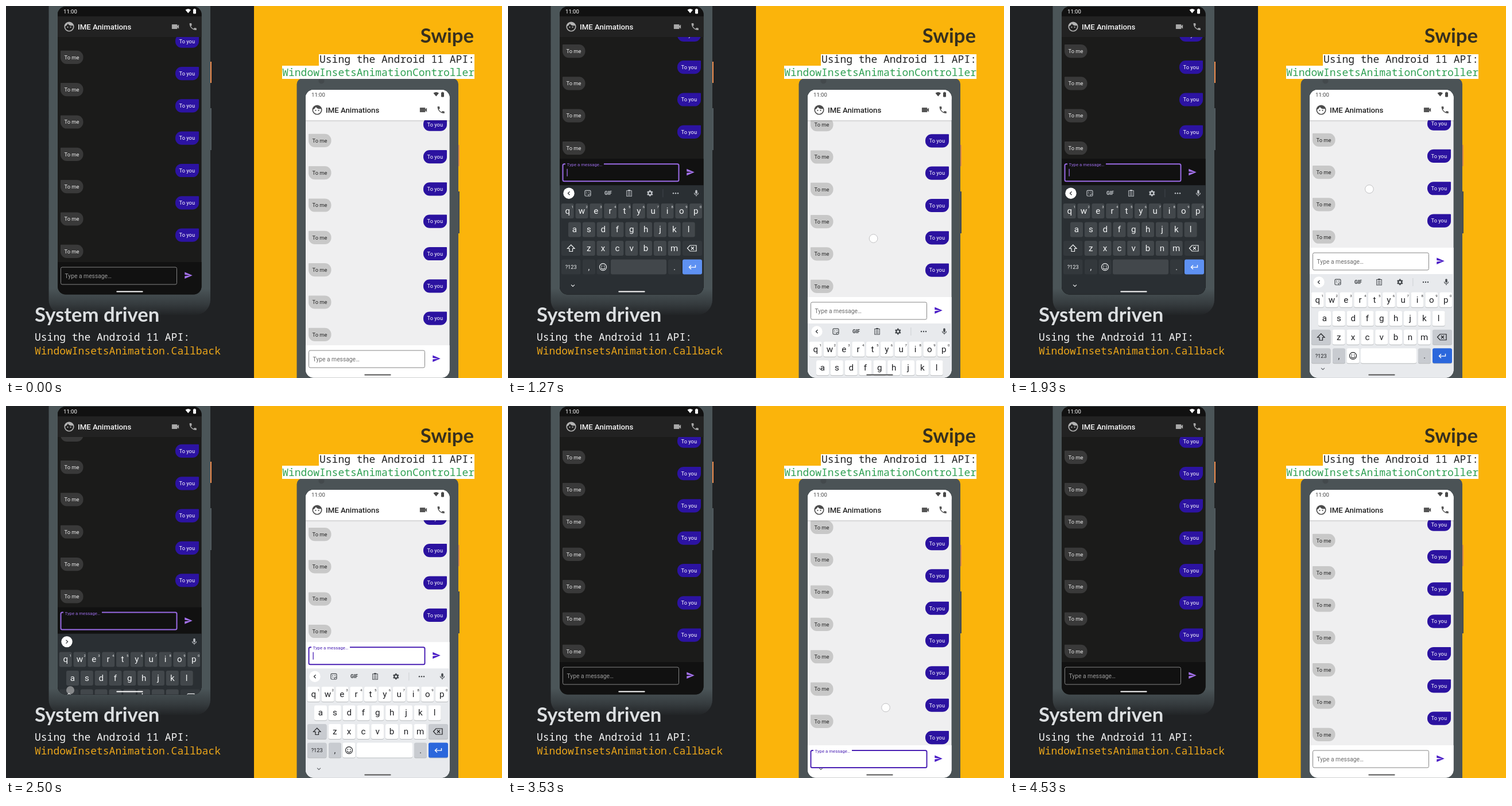
Animation of 864x648 px, one loop 4.7 s. Source, as an HTML page with a canvas:

```html
<!DOCTYPE html>
<html lang="en">
<head>
<meta charset="utf-8">
<title>Keyboard animations</title>
<style>
html, body { margin: 0; width: 100%; height: 100%; overflow: hidden; background: #202224; }
canvas { display: block; width: 864px; height: 648px; }
</style>
</head>
<body>
<canvas id="stage" width="864" height="648"></canvas>
<script>
const ctx = document.getElementById('stage').getContext('2d');
const LOOP = 4700, OPEN = 179.8;
const SANS = 'Roboto, sans-serif', MONO = '"Noto Sans Mono", monospace', TITLE = 'Lato, sans-serif';

const DARK = {
  body: '#4b5558', status: '#111111', header: '#222222', chat: '#1b1b1a', panel: '#111111',
  icon: '#a8a8a8', face: '#b4b4b4', title: '#f4f4f4', statusInk: '#ffffff',
  me: '#393939', meInk: '#eeeeee', you: '#2c13a2', line: '#848484', hint: '#9b9b9b',
  accent: '#9a6be6', send: '#a572ee', board: '#2a2f33', key: '#42474b', fn: '#33383c',
  keyInk: '#f1f3f4', tool: '#bdc1c6', round: '#ffffff', enter: '#5e91f2', enterInk: '#ffffff',
  pill: '#ffffff', orange: '#ee8b4c', side: '#50595d'
};
const LIGHT = {
  body: '#4b5356', status: '#ffffff', header: '#ffffff', chat: '#efeff0', panel: '#ffffff',
  icon: '#555555', face: '#4c4c4c', title: '#222222', statusInk: '#474747',
  me: '#c8c8c8', meInk: '#222222', you: '#2b12a0', line: '#858585', hint: '#6c6c6c',
  accent: '#4a20b4', send: '#4a1cc6', board: '#e8eaed', key: '#ffffff', fn: '#c8cbd0',
  keyInk: '#202124', tool: '#44484c', round: '#ffffff', enter: '#2b67dc', enterInk: '#ffffff',
  pill: '#555555', orange: '#dd8b43', side: '#454c50', shadow: true
};

// 24-unit icons
const ICONS = {
  video: 'M17 10.5V7c0-.55-.45-1-1-1H4c-.55 0-1 .45-1 1v10c0 .55.45 1 1 1h12c.55 0 1-.45 1-1v-3.5l4 4v-11l-4 4z',
  call: 'M6.6 10.8c1.4 2.8 3.8 5.1 6.6 6.6l2.2-2.2c.3-.3.7-.4 1-.2 1.1.4 2.3.5 3.6.5.5 0 1 .5 1 1V20c0 .5-.5 1-1 1C10.600 21 3 13.400 3 4c0-.5.5-1 1-1h3.500c.5 0 1 .5 1 1 0 1.250.2 2.450.6 3.600.1.3 0 .7-.3 1z',
  face: 'M7.7 13a1.300 1.300 0 1 0 2.600 0a1.300 1.300 0 1 0-2.600 0zM13.700 13a1.300 1.300 0 1 0 2.600 0a1.300 1.300 0 1 0-2.600 0zM12 2a10 10 0 1 0 0 20a10 10 0 1 0 0-20zm0 18c-4.400 0-8-3.600-8-8l.05-.86c2.360-1.050 4.230-2.980 5.200-5.370C11.070 8.330 14.050 10 17.420 10l2.250-.26c.2.7.33 1.470.33 2.260 0 4.400-3.600 8-8 8z',
  send: 'M2 21L23 12L2 3V10L17 12L2 14z',
  mic: 'M12 14a3 3 0 0 0 3-3V5a3 3 0 0 0-6 0v6a3 3 0 0 0 3 3zM5 11h2a5 5 0 0 0 10 0h2a7 7 0 0 1-6 6.900V21h-2v-3.100A7 7 0 0 1 5 11z',
  wifi: 'M12 21L0 6.500Q12-2 24 6.500z'
};
for (const k in ICONS) ICONS[k] = new Path2D(ICONS[k]);

const clamp = (v, a = 0, b = 1) => Math.min(b, Math.max(a, v));
const lerp = (a, b, p) => a + (b - a) * p;
const ramp = (t, a, b) => clamp((t - a) / (b - a));
const smooth = p => p * p * (3 - 2 * p);

function track(t, pts) {
  if (t <= pts[0][0]) return pts[0][1];
  for (let i = 1; i < pts.length; i++) {
    const [a, va] = pts[i - 1], [b, vb] = pts[i];
    if (t <= b) return lerp(va, vb, (t - a) / (b - a));
  }
  return pts[pts.length - 1][1];
}

// cubic-bezier(.2, 0, 0, 1)
function glide(x) {
  let lo = 0, hi = 1;
  for (let i = 0; i < 24; i++) {
    const m = (lo + hi) / 2;
    if (0.6 * m * (1 - m) * (1 - m) + m * m * m < x) lo = m; else hi = m;
  }
  return lo * lo * (3 - 2 * lo);
}

function text(s, x, y, size, color, { weight = 400, align = 'left', family = SANS } = {}) {
  ctx.font = `${weight} ${size}px ${family}`;
  ctx.textAlign = align;
  ctx.fillStyle = color;
  ctx.fillText(s, x, y);
}
const label = (s, x, y, size, color, opt) => text(s, x, y + size * 0.355, size, color, opt);

function rect(x, y, w, h, color) {
  ctx.fillStyle = color;
  ctx.fillRect(x, y, w, h);
}
function round(x, y, w, h, r, color) {
  ctx.fillStyle = color;
  ctx.beginPath();
  ctx.roundRect(x, y, w, h, r);
  ctx.fill();
}
function disc(x, y, r, color) {
  ctx.fillStyle = color;
  ctx.beginPath();
  ctx.arc(x, y, r, 0, Math.PI * 2);
  ctx.fill();
}
function ring(x, y, r, color, width = 1.2) {
  ctx.strokeStyle = color;
  ctx.lineWidth = width;
  ctx.beginPath();
  ctx.arc(x, y, r, 0, Math.PI * 2);
  ctx.stroke();
}
function line(pts, color, width = 1.3, close) {
  ctx.strokeStyle = color;
  ctx.lineWidth = width;
  ctx.beginPath();
  for (const [x, y] of pts) ctx.lineTo(x, y);
  if (close) ctx.closePath();
  ctx.stroke();
}
function icon(name, x, y, scale, color) {
  ctx.save();
  ctx.translate(x - 12 * scale, y - 12 * scale);
  ctx.scale(scale, scale);
  ctx.fillStyle = color;
  ctx.fill(ICONS[name], 'evenodd');
  ctx.restore();
}

function smiley(x, y, r, color) {
  ring(x, y, r, color);
  disc(x - r * 0.37, y - r * 0.25, 0.9, color);
  disc(x + r * 0.37, y - r * 0.25, 0.9, color);
  ctx.beginPath();
  ctx.arc(x, y + 0.4, r * 0.55, 0.2, Math.PI - 0.2);
  ctx.stroke();
}

function toolbar(c, y, collapsed) {
  const ink = c.tool;
  disc(106, y, 9.7, c.round);
  const d = collapsed ? 1 : -1;
  line([[106 - d * 1.5, y - 3], [106 + d * 1.5, y], [106 - d * 1.5, y + 3]], '#303438');
  icon('mic', 328, y, 0.58, ink);
  if (collapsed) return;
  ctx.strokeStyle = ink;
  ctx.lineWidth = 1.2;
  ctx.beginPath();
  ctx.roundRect(134, y - 4.8, 10, 9.6, 1.5);
  ctx.stroke();
  line([[140.500, y + 4.800], [140.500, y + 1.500], [144, y + 1.500]], ink, 1);
  disc(137, y - 1.8, 0.8, ink);
  disc(141, y - 1.8, 0.8, ink);
  line([[136.500, y + 0.500], [138.500, y + 2]], ink, 1);
  label('GIF', 174.5, y, 8.4, ink, { weight: 900, align: 'center' });
  ctx.strokeRect(206.7, y - 4.5, 8.6, 9.6);
  rect(209, y - 6, 4, 2.5, ink);
  for (const dy of [-1.8, 0.4, 2.6]) rect(208.5, y + dy, 5, 0.9, ink);
  ring(247.3, y, 3, ink, 2.2);
  for (let i = 0; i < 6; i++) {
    const a = i * Math.PI / 3 + Math.PI / 6, u = Math.cos(a), v = Math.sin(a);
    line([[247.3 + u * 3.2, y + v * 3.2], [247.3 + u * 5.4, y + v * 5.4]], ink, 2.2);
  }
  ctx.globalAlpha = 0.2;
  rect(269.500, y - 7, 0.8, 14, ink);
  ctx.globalAlpha = 1;
  for (const x of [288, 292, 296]) disc(x, y, 1.2, ink);
}

function key(c, x, y, w, color) {
  if (c.shadow) round(x, y - 12.2, w, 26.2, 3, 'rgba(60,64,67,.28)');
  round(x, y - 13, w, 26, 3, color);
}

function keyboard(c, top, collapsed) {
  rect(90, top, 251, 200, c.board);
  toolbar(c, top + 14, collapsed);
  const rows = [['qwertyuiop', 103.700, 44.800], ['asdfghjkl', 116, 77.300], ['zxcvbnm', 140.700, 109.800]];
  for (const [chars, x0, dy] of rows) {
    [...chars].forEach((ch, i) => {
      const x = x0 + i * 24.83, y = top + dy;
      key(c, x - 11, y, 22, c.key);
      label(ch, x, y - 0.6, 15.2, c.keyInk, { align: 'center' });
      if (dy < 50) label(String((i + 1) % 10), x + 8.6, y - 7, 6, c.keyInk, { align: 'center' });
    });
  }
  const y3 = top + 109.8, y4 = top + 142.4, ink = c.keyInk;
  key(c, 93, y3, 33.5, c.fn);
  line([[109.7, y3 - 6], [116, y3 + 0.5], [112.500, y3 + 0.5], [112.500, y3 + 5.500],
    [107, y3 + 5.500], [107, y3 + 0.5], [103.500, y3 + 0.5]], ink, 1.2, true);
  key(c, 304, y3, 34, c.fn);
  line([[312.500, y3], [317, y3 - 5], [328, y3 - 5], [328, y3 + 5], [317, y3 + 5]], ink, 1.2, true);
  line([[319, y3 - 2.500], [324, y3 + 2.500]], ink, 1.2);
  line([[324, y3 - 2.500], [319, y3 + 2.500]], ink, 1.2);

  key(c, 93, y4, 33.5, c.fn);
  label('?123', 109.7, y4, 9.3, ink, { align: 'center' });
  key(c, 130, y4, 22, c.fn);
  label(',', 141, y4 + 0.5, 14, ink, { align: 'center' });
  key(c, 154.500, y4, 22, c.shadow ? c.key : c.fn);
  smiley(165.500, y4, 6, ink);
  key(c, 179, y4, 97, c.key);
  key(c, 279, y4, 22, c.fn);
  label('.', 290, y4, 14, ink, { align: 'center' });
  key(c, 304, y4, 34, c.enter);
  line([[326.500, y4 - 3.500], [326.500, y4 + 0.5], [315.500, y4 + 0.5]], c.enterInk, 1.4);
  line([[319, y4 - 3], [315.500, y4 + 0.5], [319, y4 + 4]], c.enterInk, 1.4);
}

function bubbles(c, shift, scroll) {
  for (let i = 0; i < 22; i++) {
    const y = 427.3 - 28.16 * i - shift + scroll;
    if (y < 36 || y > 470) continue;
    if (i % 2) {
      round(295, y - 11.6, 41, 23.2, [11, 1, 11, 11], c.you);
      label('To you', 315.3, y, 9.3, '#ffffff', { align: 'center' });
    } else {
      round(95, y - 11.6, 39.5, 23.2, [1, 11, 11, 11], c.me);
      label('To me', 114.5, y, 9.3, c.meInk, { align: 'center' });
    }
  }
}

function field(c, y, focus, caret) {
  const w = lerp(1, 2, focus);
  ctx.strokeStyle = focus > 0.5 ? c.accent : c.line;
  ctx.lineWidth = w;
  ctx.beginPath();
  ctx.roundRect(95.500, y - 15, 202, 30, 2.5);
  ctx.stroke();
  if (focus > 0) rect(100, y - 17, 67 * focus, 4, c.panel);
  label('Type a message…', 102.5, lerp(y, y - 13.7, focus), lerp(10.3, 7.8, focus),
    focus > 0.5 ? c.accent : c.hint);
  if (caret) rect(102.500, y - 6.500, 1.3, 13, c.accent);
  icon('send', 317.7, y - 0.7, 0.64, c.send);
}

function phone(c, s) {
  rect(356, 97, 2, 37, c.orange);
  rect(356, 178, 2, 73, c.side);
  if (c === DARK) {
    const g = ctx.createLinearGradient(0, 492, 0, 540);
    g.addColorStop(0, c.body);
    g.addColorStop(0.55, '#363c3f');
    g.addColorStop(1, '#202224');
    round(74.500, -40, 281.500, 578, 26, g);
  } else {
    round(74.500, -19, 281.500, 560, [10, 10, 0, 0], c.body);
    disc(117.500, -14.500, 5, '#43494c');
  }

  ctx.save();
  ctx.beginPath();
  ctx.roundRect(90, 1, 250.6, 501.6, 14);
  ctx.clip();
  rect(90, 0, 251, 503, c.chat);
  bubbles(c, s.shift, s.scroll);
  rect(90, 446 - s.shift, 251, 503, c.panel);
  field(c, 470 - s.shift, s.focus, s.caret);
  if (s.shift > 0) keyboard(c, 492 - s.shift, s.collapsed);
  if (s.chevron) line([[110, 485.700], [113, 488.500], [116, 485.700]], c.shadow ? '#5f6368' : '#f1f3f4', 1.1);
  round(192.300, 496.600, 46.300, 1.9, 1, c.pill);

  if (c.shadow) {
    const g = ctx.createLinearGradient(0, 53, 0, 57);
    g.addColorStop(0, 'rgba(0,0,0,.18)');
    g.addColorStop(1, 'rgba(0,0,0,0)');
    rect(90, 53, 251, 4, g);
  }
  rect(90, 0, 251, 54, c.header);
  rect(90, 0, 251, 18, c.status);
  label('11:00', 100, 9.5, 9.6, c.statusInk);
  icon('wifi', 317.3, 9, 0.4, c.statusInk);
  round(326, 5.600, 5, 7.800, 0.8, c.statusInk);
  rect(327.500, 4.700, 2, 1.2, c.statusInk);
  icon('face', 110, 36, 0.86, c.face);
  label('IME Animations', 125, 36.4, 13.2, c.title, { weight: 500 });
  icon('video', 295, 36, 0.68, c.icon);
  icon('call', 325.7, 36, 0.68, c.icon);
  ctx.restore();
}

function leftState(t) {
  const shift = OPEN * (glide(ramp(t, 908, 1193)) - glide(ramp(t, 2437, 2777)));
  const focus = ramp(t, 860, 950) - ramp(t, 2780, 2880);
  return {
    shift: shift < 0.05 ? 0 : shift, scroll: 0, focus, collapsed: t > 2437, chevron: t > 908 && t < 2437,
    caret: focus === 1 && Math.floor((t - 900) / 500) % 2 === 0
  };
}

function rightState(t) {
  const s = { shift: 0, scroll: 0, collapsed: false, finger: null };
  if (t < 2300) {
    const y = track(t, [[560, 494], [660, 490], [970, 449], [1630, 352.5], [1850, 323], [1950, 318]]);
    s.shift = clamp(489 - y, 0, OPEN);
    s.shift = lerp(s.shift, OPEN, smooth(ramp(t, 1950, 2100)));
    if (t >= 560 && t < 1950) s.finger = [630 + (y - 352) * 0.124, y];
  } else {
    const y = track(t, [[3040, 302], [3130, 310], [3230, 350], [3330, 410], [3530, 525], [3640, 570]]);
    s.shift = clamp(484 - y, 0, OPEN);
    s.scroll = Math.max(0, y - 492) + 14 * smooth(ramp(t, 3640, 3850));
    s.scroll *= 1 - smooth(ramp(t, 4050, 4450));
    if (t >= 3040 && t < 3640) s.finger = [624 + (y - 310) * 0.158, y];
  }
  s.focus = ramp(t, 2020, 2110) - ramp(t, 3640, 3740);
  s.caret = s.focus === 1 && Math.floor((t - 2020) / 500) % 2 === 0;
  s.chevron = s.shift > 0 || (t > 3000 && t < 3640);
  return s;
}

function draw(t) {
  rect(0, 0, 432, 648, '#202224');
  rect(432, 0, 432, 648, '#fbb40b');

  phone(DARK, leftState(t));
  if (t >= 2400 && t < 2560) disc(112, 495, 7, 'rgba(190,190,190,.6)');
  text('System driven', 50, 550, 34.7, '#dcdfe1', { weight: 700, family: TITLE });
  text('Using the Android 11 API:', 50, 583, 18, '#f5f5f5', { family: MONO });
  text('WindowInsetsAnimation.Callback', 50, 607, 18, '#eba61a', { family: MONO });

  const right = rightState(t);
  ctx.save();
  ctx.translate(432, 145);
  phone(LIGHT, right);
  ctx.restore();
  if (right.finger) {
    const [x, y] = right.finger;
    disc(x, y, 7.3, 'rgba(255,255,255,.92)');
    ring(x, y, 7.3, '#bcbcbe', 0.9);
  }
  text('Swipe', 815, 64, 34.7, '#37301f', { weight: 700, family: TITLE, align: 'right' });
  rect(545, 84, 271, 21, '#ffffff');
  rect(481, 104, 335, 23, '#ffffff');
  text('Using the Android 11 API:', 816, 99, 18, '#242424', { family: MONO, align: 'right' });
  text('WindowInsetsAnimationController', 816, 122, 18, '#2fa053', { family: MONO, align: 'right' });
}

const start = performance.now();
function frame() {
  draw((performance.now() - start) % LOOP);
  requestAnimationFrame(frame);
}
frame();
</script>
</body>
</html>
```
